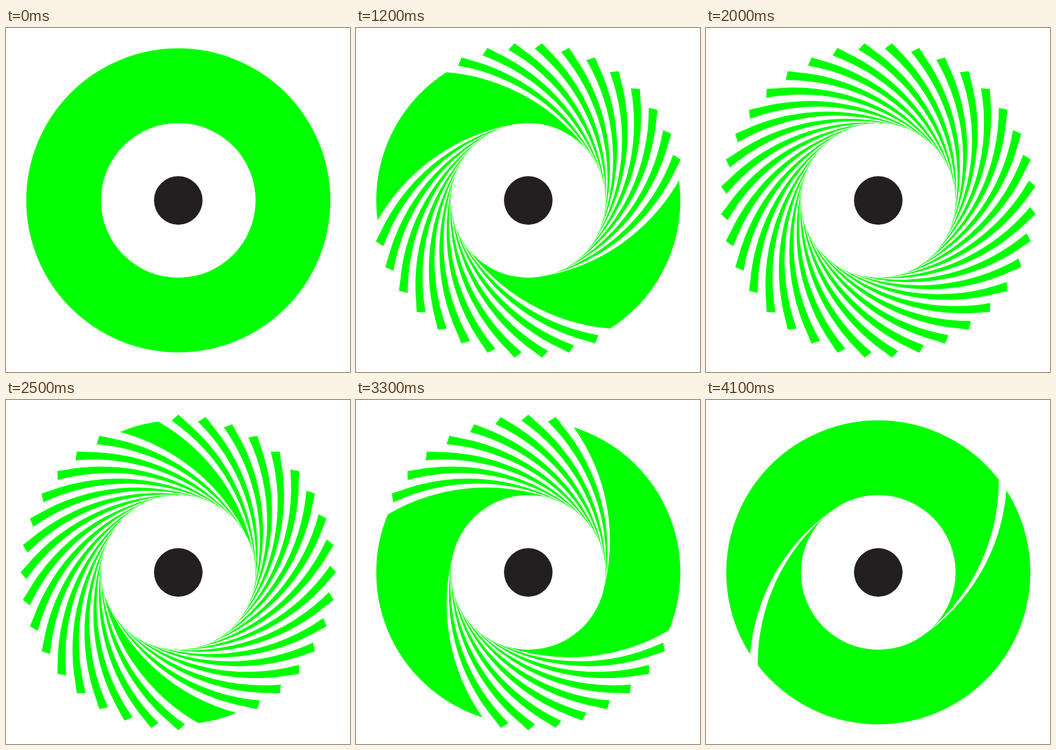
Write an HTML page with a canvas that moves like this. It is 500x500 px and loops after 4.2 s.

```html
<!DOCTYPE html>
<html lang="en">
<head>
<meta charset="utf-8">
<title>Iris</title>
<style>
  html, body { margin: 0; width: 100%; height: 100%; overflow: hidden; background: #fff; }
  canvas { display: block; width: 500px; height: 500px; }
</style>
</head>
<body>
<canvas id="stage" width="500" height="500"></canvas>
<script>
const ctx = document.getElementById('stage').getContext('2d');
const GREEN = '#00ff00', WHITE = '#ffffff', DARK = '#231f20';
const CX = 250.4, CY = 250.6;
const OUTER = 221, INNER = 112.4, PEAK = 229.3, PUPIL = 35.3;
const STEP = 100, STEPS = 42, SLITS = 18;

// Every blade edge is an arc that starts on the rim and touches the inner circle SWEEP degrees later.
const SWEEP = 88, EDGE = 285, HALF = 2.5;
const rad = deg => deg * Math.PI / 180;
const polar = (deg, r) => [r * Math.sin(rad(deg)), -r * Math.cos(rad(deg))];

function fillPath(color, build) {
  ctx.beginPath();
  build();
  ctx.fillStyle = color;
  ctx.fill();
}

const disc = (r, color) => fillPath(color, () => ctx.arc(0, 0, r, 0, 2 * Math.PI));

function edge(deg, inward) {
  const [cx, cy] = polar(deg + SWEEP, INNER - EDGE);
  const [px, py] = polar(deg, OUTER);
  const rim = Math.atan2(py - cy, px - cx);
  let touch = rad(deg + SWEEP - 90);
  touch = rim + Math.atan2(Math.sin(touch - rim), Math.cos(touch - rim));
  if (inward) ctx.arc(cx, cy, EDGE, rim, touch);
  else ctx.arc(cx, cy, EDGE, touch, rim, true);
}

function slit(deg) {
  fillPath(WHITE, () => {
    edge(deg - HALF, true);
    edge(deg + HALF, false);
    ctx.lineTo(...polar(deg + HALF, OUTER + 1.5));
    ctx.lineTo(...polar(deg, OUTER + 2));
    ctx.lineTo(...polar(deg - HALF, OUTER + 1.5));
  });
}

function cap(deg) {
  fillPath(GREEN, () => {
    ctx.moveTo(...polar(deg - HALF, OUTER));
    ctx.lineTo(...polar(deg, PEAK));
    ctx.lineTo(...polar(deg + HALF, OUTER));
    ctx.lineTo(...polar(deg, OUTER - 1));
  });
}

// First slit angle and number of slits: they open one by one, spin, then close one by one.
function slitRange(n) {
  if (n <= 24) return { first: (n < 6 ? -70 : -90) + 5 * n, count: Math.min(n, SLITS) };
  const closed = n - 24;
  return { first: 40 + 10 * closed + 5 * n, count: SLITS - closed };
}

function draw(n) {
  const { first, count } = slitRange(n);
  const caps = count === SLITS ? SLITS : count - 1;
  ctx.setTransform(1, 0, 0, 1, 0, 0);
  ctx.fillStyle = WHITE;
  ctx.fillRect(0, 0, 500, 500);
  ctx.translate(CX, CY);
  disc(OUTER, GREEN);
  for (const side of [0, 180]) {
    for (let i = 0; i < count; i++) slit(first + 10 * i + side);
  }
  for (const side of [0, 180]) {
    for (let i = 0; i < caps; i++) cap(first + 10 * i + 5 + side);
  }
  disc(INNER, WHITE);
  disc(PUPIL, DARK);
}

let start = null, shown = -1;
function tick(now) {
  if (start === null) start = now;
  const n = Math.floor((now - start) / STEP) % STEPS;
  if (n !== shown) draw(shown = n);
  requestAnimationFrame(tick);
}
draw(0);
requestAnimationFrame(tick);
</script>
</body>
</html>
```
